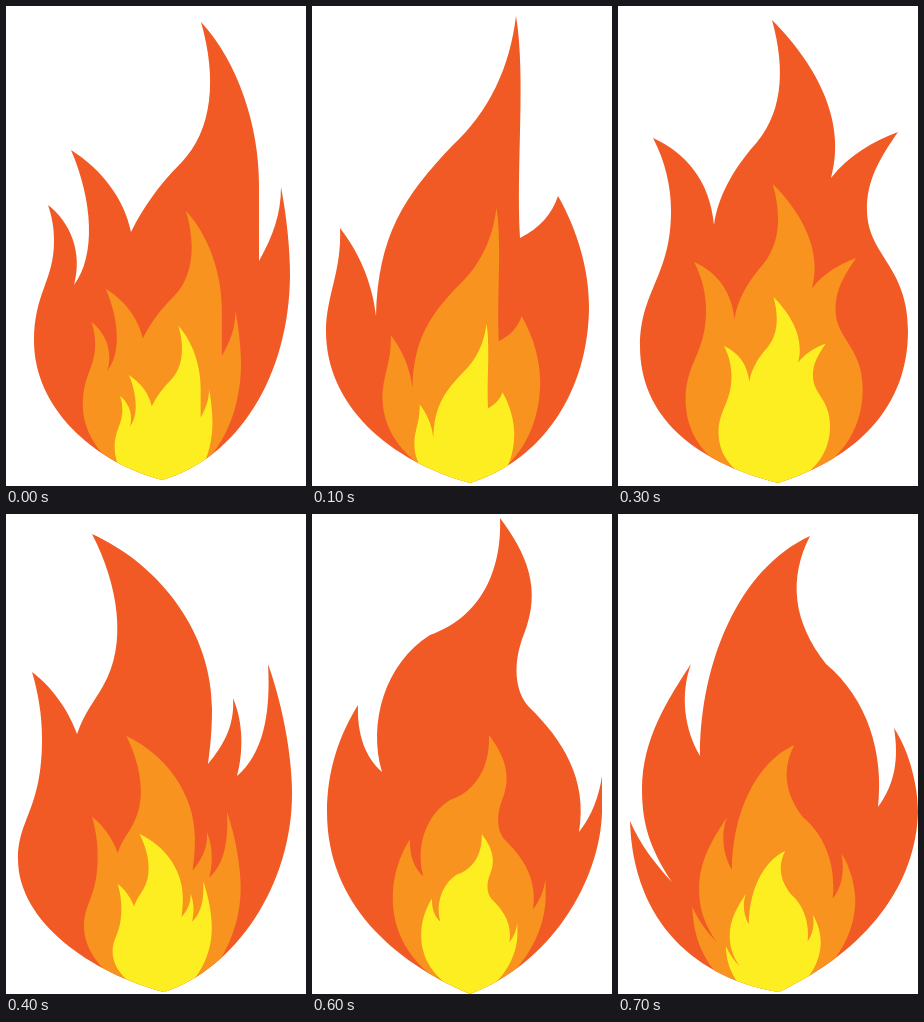
Write an HTML page that moves like this. It is 300 px wide and 480 px high and loops after 0.8 s.

```html
<!DOCTYPE html>
<html lang="en">
<head>
<meta charset="utf-8">
<title>Flame</title>
<style>
  html, body { margin: 0; width: 100%; height: 100%; overflow: hidden; background: #fff; }
  svg { display: block; width: 100%; height: 100%; }
</style>
</head>
<body>
<svg viewBox="0 0 300 480">
  <clipPath id="edge"><path id="mask"/></clipPath>
  <path id="outer" fill="#f15a24"/>
  <g clip-path="url(#edge)">
    <path id="middle" fill="#f7931e"/>
    <path id="core" fill="#fcee21"/>
  </g>
</svg>
<script>
const STEP = 100;
const get = id => document.getElementById(id);
const [mask, outer, middle, core] = ['mask', 'outer', 'middle', 'core'].map(get);

// A layer is the outer shape shrunk and moved: [scaleX, scaleY, x, y], or its own path.
const poses = [
  {
    outer: `M195 16 C232 56 253 120 253 178 L253 255 C267 230 275 208 275 181
      C281 212 284 245 284 270 C283 370 232 452 156 474 C85 455 28 400 28 335
      C28 287 48 275 48 235 C48 222 46 211 42 199 C64 216 77 246 68 279
      C90 250 87 195 65 144 C95 163 118 192 125 226 C137 202 152 180 175 157
      C207 124 211 72 195 16Z`,
    middle: [.618, .607, 59.5, 195.3],
    core: [.382, .382, 98, 314]
  },
  {
    outer: `M204 10 C214 70 204 160 208 232 C228 222 240 208 246 190
      C266 225 277 265 277 300 C277 385 230 455 158 477 C78 455 14 400 14 325
      C14 290 30 265 28 222 C46 245 60 275 64 310 C66 230 92 190 140 140
      C178 105 198 60 204 10Z`,
    middle: [.6, .6, 62, 196],
    core: [.38, .38, 97, 314]
  },
  {
    outer: `M214 33 C110 56 44 150 44 245 C44 285 50 318 61 352 C30 334 14 298 15 250
      C5 272 0 295 0 320 C0 395 65 452 161 479 C215 447 269 388 269 323
      C269 275 248 238 216 203 C226 245 226 285 211 306 C180 270 173 224 186 174
      C170 188 158 203 155 218 C143 145 165 75 214 33Z`,
    middle: `M120 230 C90 262 82 325 94 370 C98 392 102 408 105 423 C85 415 73 400 71 378
      C64 395 65 415 77 434 L80 480 H215 L221 440 C229 405 221 368 199 341
      C198 360 192 378 184 387 C170 375 163 350 173 326 C162 334 155 345 154 360
      C128 330 109 275 120 230Z`,
    core: `M120 347 C108 365 104 395 110 417 C113 430 116 440 119 449 C106 446 98 438 94 427
      C90 440 95 452 103 460 L110 485 H200 L205 455 C209 435 203 415 191 400
      C191 415 187 430 181 437 C175 427 171 408 173 389 C160 395 150 405 149 419
      C133 403 121 378 120 347Z`
  },
  {
    outer: `M154 14 C194 54 230 112 213 172 C230 150 255 135 280 126
      C262 152 248 175 249 205 C250 250 290 260 290 325 C290 400 240 452 160 477
      C75 455 22 410 22 340 C22 285 53 270 53 205 C53 180 47 155 35 132
      C68 147 92 175 96 219 C100 190 115 165 133 143 C165 110 168 65 154 14Z`,
    middle: [.661, .661, 53, 168.7],
    core: [.416, .415, 91.4, 285.2]
  },
  {
    outer: `M86 20 C156 52 206 120 206 195 C206 218 204 235 202 250
      C217 232 229 212 227 184 C238 210 237 240 231 262 C257 240 265 200 262 150
      C278 195 286 245 286 280 C286 370 230 455 158 478 C85 459 12 408 12 345
      C12 305 36 295 36 225 C36 200 32 178 26 158 C45 172 62 195 71 220
      C79 197 89 187 97 172 C122 130 112 70 86 20Z`,
    middle: [.572, .585, 71.1, 210.3],
    core: [.362, .362, 102.3, 312.8]
  },
  {
    outer: `M138 2 C185 40 222 100 210 165 C208 200 245 230 250 288
      C270 265 280 235 278 205 C286 235 289 262 289 290 C288 365 235 450 158 479
      C78 458 13 400 13 320 C13 270 38 240 34 170 C50 190 63 213 70 240
      C74 190 98 172 118 140 C146 95 150 50 138 2Z`,
    middle: [.565, .565, 72, 214],
    core: [.357, .357, 104, 316]
  },
  {
    outer: `M188 4 C215 40 230 75 212 120 C200 150 203 178 217 193
      C250 225 276 265 267 318 C280 302 287 282 290 262 L290 298
      C288 368 238 450 158 480 C80 447 15 388 15 298 C15 255 28 220 46 191
      C45 220 53 243 70 258 C56 210 72 150 118 121 C172 102 190 52 188 4Z`,
    middle: [.556, .556, 72.4, 218.8],
    core: [.35, .345, 103.9, 318.6]
  },
  {
    outer: `M192 22 C170 65 175 108 208 150 C250 185 266 240 260 293
      C277 270 281 245 276 214 C293 240 300 275 300 298 C298 370 250 436 161 478
      C80 465 15 410 12 307 C22 330 37 350 54 368 C32 335 24 310 24 275
      C24 225 50 185 73 150 C62 180 66 215 82 242 C82 150 120 55 192 22Z`,
    middle: [.566, .568, 67.5, 218.4],
    core: [.33, .333, 103.8, 329.7]
  }
];

function setLayer(el, layer, base) {
  const own = typeof layer === 'string';
  const [sx, sy, x, y] = own ? [1, 1, 0, 0] : layer;
  el.setAttribute('d', own ? layer : base);
  el.setAttribute('transform', `matrix(${sx} 0 0 ${sy} ${x} ${y})`);
}

let shown = -1;

function draw(time) {
  const index = Math.floor(time / STEP) % poses.length;
  if (index === shown) return;
  shown = index;
  const pose = poses[index];
  mask.setAttribute('d', pose.outer);
  outer.setAttribute('d', pose.outer);
  setLayer(middle, pose.middle, pose.outer);
  setLayer(core, pose.core, pose.outer);
}

const start = performance.now();

function tick() {
  draw(performance.now() - start);
  requestAnimationFrame(tick);
}

tick();
</script>
</body>
</html>
```
